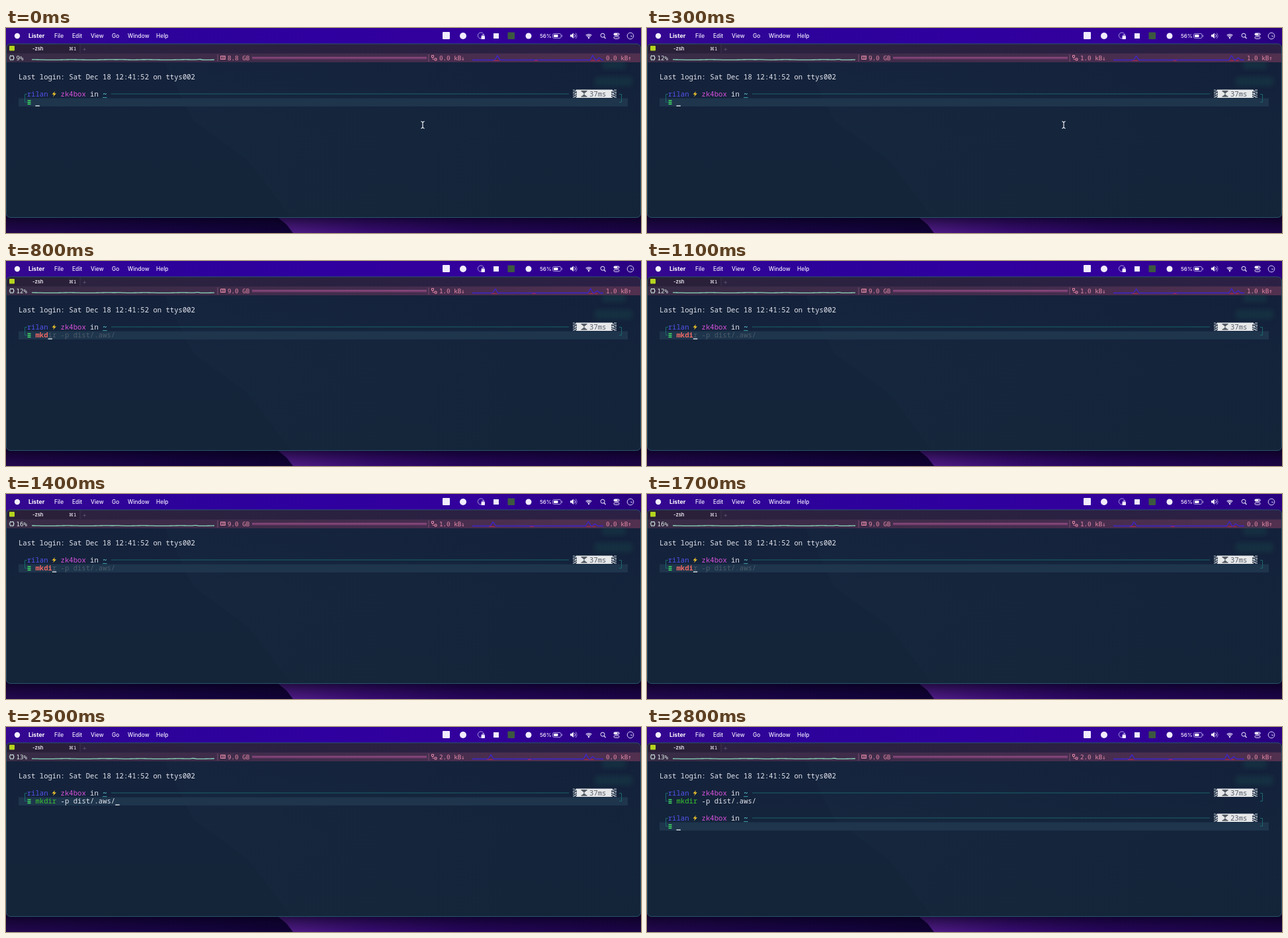
Recreate the animation shown at these times as an HTML page with a canvas. Size 960 by 311 pixels, loop 2.9 s.

```html
<!DOCTYPE html>
<html lang="en">
<head>
<meta charset="utf-8">
<title>Terminal autosuggestion</title>
<style>
  html, body { margin: 0; width: 100%; height: 100%; overflow: hidden; background: #150342; }
  canvas { display: block; }
</style>
</head>
<body>
<canvas id="stage" width="960" height="311"></canvas>
<script>
const ctx = document.getElementById('stage').getContext('2d');
const LOOP = 2900;
const CELL = 6.36, LEFT = 19;
const MONO = '10.6px "Noto Sans Mono", monospace';
const MONO_BOLD = 'bold ' + MONO;
const SMALL = '9.2px "DejaVu Sans Mono", monospace';
const UI = 'Inter, sans-serif';
const TEAL = '#19686c', WHITE = '#e4e6ee', PINK = '#e38aa6', ICON = '#f1ecff';
const COMMAND = 'mkdir -p dist/.aws/';

// Each entry holds from its time until the next one.
const typing = [
  { at: 0, typed: '', hint: '' },
  { at: 500, typed: 'm', hint: 'an cp' },
  { at: 700, typed: 'mk', hint: COMMAND.slice(2) },
  { at: 800, typed: 'mkd', hint: COMMAND.slice(3) },
  { at: 1000, typed: 'mkdi', hint: COMMAND.slice(4) },
  { at: 1900, typed: COMMAND, hint: '' },
  { at: 2700, typed: '', hint: '', done: true }
];
const stats = [
  { at: 0, cpu: 9, ram: '8.8', down: '0.0', up: '0.0' },
  { at: 300, cpu: 12, ram: '9.0', down: '1.0', up: '1.0' },
  { at: 1300, cpu: 16, ram: '9.0', down: '1.0', up: '0.0' },
  { at: 2300, cpu: 13, ram: '9.0', down: '2.0', up: '0.0' }
];
const indexAt = (list, t) => list.findLastIndex(item => item.at <= t);
const col = n => LEFT + n * CELL;

function rect(x, y, w, h, color, r = 0) {
  ctx.fillStyle = color;
  ctx.beginPath();
  ctx.roundRect(x, y, w, h, r);
  ctx.fill();
}
function outline(x, y, w, h, color, r = 0) {
  ctx.strokeStyle = color;
  ctx.lineWidth = 1;
  ctx.beginPath();
  ctx.roundRect(x, y, w, h, r);
  ctx.stroke();
}
function text(str, x, y, color, font = MONO) {
  ctx.font = font;
  ctx.fillStyle = color;
  ctx.fillText(str, x, y);
}
function line(points, color, width = 1) {
  ctx.strokeStyle = color;
  ctx.lineWidth = width;
  ctx.beginPath();
  points.forEach(([x, y]) => ctx.lineTo(x, y));
  ctx.stroke();
}
function shape(points, color) {
  ctx.fillStyle = color;
  ctx.beginPath();
  points.forEach(([x, y]) => ctx.lineTo(x, y));
  ctx.fill();
}
function arc(x, y, r, color, from = 0, to = Math.PI * 2, width = 1) {
  ctx.strokeStyle = color;
  ctx.lineWidth = width;
  ctx.beginPath();
  ctx.arc(x, y, r, from, to);
  ctx.stroke();
}
const dot = (x, y, r, color) => rect(x - r, y - r, 2 * r, 2 * r, color, r);
function gradient(x0, y0, x1, y1, ...colors) {
  const g = ctx.createLinearGradient(x0, y0, x1, y1);
  colors.forEach((c, i) => g.addColorStop(i / (colors.length - 1), c));
  return g;
}

function wallpaper() {
  rect(0, 0, 960, 26, gradient(0, 0, 960, 0, '#35088f', '#2d029b', '#2f009f', '#33009b', '#290080'));
  rect(0, 26, 960, 285, gradient(0, 0, 430, 0, '#2a0a5c', '#1c0550', '#12033c'));
  shape([[408, 285], [960, 285], [960, 311], [434, 311], [424, 298]],
    gradient(410, 0, 960, 0, '#6224a2', '#430f86', '#2e076c', '#26065e', '#200550'));
  // Window shadow
  rect(0, 285, 960, 26, gradient(0, 287, 0, 311, 'rgba(5,0,20,.68)', 'rgba(5,0,20,.4)', 'rgba(5,0,20,.18)'));
}

function menuBar() {
  dot(17, 12, 4.2, '#f4f0ff');
  text('Lister', 34, 15, '#fff', 'bold 8.8px ' + UI);
  [['File', 73], ['Edit', 100], ['View', 128], ['Go', 160], ['Window', 184], ['Help', 227]]
    .forEach(([label, x]) => text(label, x, 15, ICON, '500 8.4px ' + UI));

  rect(660, 6, 11, 11, ICON, 1);
  dot(691, 12, 5, ICON);
  arc(718, 11.5, 4.6, '#a99be0');
  rect(718.5, 12, 5.5, 5, ICON, 1);
  arc(721.2, 12, 1.6, ICON, Math.PI, 0);
  rect(737, 8, 8, 8, ICON);
  rect(758.5, 6.5, 10.5, 10.5, '#3c5940', 1);
  dot(790, 12, 4.5, ICON);
  text('56%', 807, 15, ICON, '500 8px ' + UI);

  outline(826.5, 8.5, 12.5, 7, '#a99be0', 2);
  rect(828, 10, 6.5, 4, '#fff', 1);
  rect(840, 10.5, 1, 3, '#a99be0');

  shape([[853, 10], [855, 10], [858, 7.5], [858, 16], [855, 13.5], [853, 13.5]], ICON);
  arc(857, 11.8, 3.6, ICON, -0.8, 0.8);
  arc(857, 11.8, 6, '#9f90dc', -0.8, 0.8);
  [2, 4.2, 6.4].forEach(r => arc(881, 16, r, ICON, -2.3, -0.84, 1.3));
  dot(881, 15.2, 1, ICON);
  arc(902, 11.2, 3, ICON);
  line([[904, 13.4], [906.5, 16]], ICON, 1.2);
  rect(918.5, 7.5, 9, 4, ICON, 2);
  dot(925.3, 9.5, 1.1, '#2d0090');
  outline(919, 13, 8, 3.2, ICON, 1.6);
  arc(944, 12, 4.8, '#d9d0fa');
  line([[944, 12], [947, 12.6]], '#d9d0fa');
}

function terminalWindow() {
  ctx.save();
  ctx.beginPath();
  ctx.roundRect(0.5, 24, 959, 263.5, 6);
  ctx.clip();
  rect(0, 24, 960, 264, gradient(0, 40, 0, 287, '#14213b', '#14253b', '#142539'));
  shape([[240, 52], [960, 52], [960, 288], [432, 288], [365, 200], [283, 140]],
    gradient(250, 0, 960, 0, 'rgba(30,50,75,.16)', 'rgba(24,44,66,.14)', 'rgba(15,30,55,.1)'));
  rect(0, 24, 960, 14.5, gradient(0, 0, 960, 0, '#2d2340', '#2a2140', '#2c2145'));
  rect(0, 24, 112, 14.5, '#2a2039');
  rect(0, 38.5, 960, 13.5, gradient(0, 0, 960, 0, '#382c46', '#3f2c4a', '#462d4f', '#52304f'));
  ctx.filter = 'blur(3px)';
  rect(901, 50, 36, 12, 'rgba(24,72,76,.38)', 4);
  rect(890, 74, 57, 14, 'rgba(24,72,76,.38)', 4);
  ctx.filter = 'none';
  ctx.restore();
  outline(0.5, 24, 959, 263.5, '#28556b', 6);

  rect(5, 27, 8, 7.5, '#b5d51e', 1);
  text('-zsh', 40, 34, '#f0edf4', '600 7.5px ' + UI);
  text('⌘1', 95, 34, '#f0edf4', '7px "DejaVu Sans", sans-serif');
  rect(111.5, 25, 1, 13, '#40354f');
  text('+', 115.5, 34.5, '#5f546d', '10px ' + UI);
}

function statusBar(stage) {
  const s = stats[stage], shift = stage * 3.3;
  outline(6, 42.5, 5.5, 5.5, '#d5e7e1');
  for (const p of [7.2, 10.2]) {
    line([[p, 41], [p, 42.3]], '#a9c5c0');
    line([[p, 48], [p, 49.6]], '#a9c5c0');
  }
  line([[4.5, 45.2], [6, 45.2]], '#a9c5c0');
  line([[11.5, 45.2], [13, 45.2]], '#a9c5c0');
  text(s.cpu + '%', 15.5, 48.7, '#dbe9e4', SMALL);

  const cpu = [];
  for (let x = 39; x <= 316; x += 3) {
    const u = x + shift;
    const bump = Math.exp(-(((u - 293) / 3) ** 2)) + 0.4 * Math.exp(-(((u - 178) / 9) ** 2));
    cpu.push([x, 48.2 - bump + 0.25 * Math.sin(u * 0.11)]);
  }
  line(cpu, '#88d9bd', 1.3);
  rect(319.5, 40, 1, 11, '#78506f');
  rect(638.5, 40, 1, 11, '#78506f');

  outline(324.5, 42.5, 7, 5, PINK);
  line([[327, 42], [327, 48]], PINK);
  line([[329.5, 42], [329.5, 48]], PINK);
  text(s.ram + ' GB', 335, 48.7, PINK, SMALL);
  line([[372, 44.5], [636, 44.5]], '#b5599b');
  line([[372, 46.5], [636, 46.5]], '#9a4b86');

  outline(643.5, 41.5, 3, 3, PINK);
  outline(648, 46, 3, 3, PINK);
  line([[645, 45], [645, 47.5], [648, 47.5]], '#b46a8d');
  text(s.down + ' kB↓', 655, 48.7, PINK, SMALL);
  text(s.up + ' kB↑', 907, 48.7, PINK, SMALL);

  const net = [];
  for (let x = 705; x <= 903; x++) {
    const u = x + shift;
    const peak = (at, height, half) => Math.max(0, height * (1 - Math.abs(u - at) / half));
    net.push([x, 48.5 - peak(743, 6.5, 4) - peak(887, 7, 4) - peak(897, 3.5, 4)]);
  }
  line(net, '#3c24d2', 1.3);
  [[737, 9], [799, 5], [884, 7], [893, 5]].forEach(([x, w]) => rect(x - shift, 48.8, w, 1.1, '#b02850'));
}

function timingPill(y, label) {
  const top = y - 6.5;
  // Dithered ends, denser towards the pill.
  for (let i = 0; i < 4; i++) {
    for (let j = 0; j < 8; j++) {
      if ((i * 5 + j * 3) % 7 >= 4) continue;
      const shade = i < 2 ? '#dfe3e7' : '#96a2ad';
      rect(861.5 - i * 1.5, top + j * 1.55, 1.5, 1.5, shade);
      rect(915 + i * 2, top + j * 1.55, 2, 1.5, shade);
    }
  }
  rect(863, top, 52, 12.5, '#e6e8ea');
  shape([[870, y - 4], [878, y - 4], [870, y + 4], [878, y + 4]], '#565d65');
  rect(869.5, y - 5, 9, 1.5, '#565d65');
  rect(869.5, y + 3.2, 9, 1.5, '#565d65');
  text(label, 882, y + 3.5, '#575e66');
}

function prompt(y, label, active) {
  if (active) rect(LEFT, y + 6.5, 921, 12.5, '#1e354c');
  line([[32, y + 0.5], [28.5, y + 0.5], [28.5, y + 12.5], [31.5, y + 12.5]], TEAL);
  line([[927, y + 0.5], [930.5, y + 0.5], [930.5, y + 12.5], [927, y + 12.5]], TEAL);
  line([[159, y], [851, y]], '#1a626b');
  text('rilan', col(2), y + 3.5, '#5354ed');
  shape([[74, y - 4], [69.5, y + 0.7], [72.5, y + 0.7], [71, y + 4.5], [76, y - 0.8], [73, y - 0.8]], '#f1c62d');
  text('zk4box', col(10), y + 3.5, '#d652dd');
  text('in', col(17), y + 3.5, WHITE);
  text('~', col(20), y + 3.5, '#65d4de', MONO_BOLD);
  rect(col(20), y + 5, CELL, 1, '#3b9eab');
  timingPill(y, label);
  for (const dy of [9.5, 12.1, 14.7]) rect(32.5, y + dy, 5, 1.5, '#42df66');
}

function commandLine(y, typed, hint) {
  const base = y + 16.2;
  if (typed === COMMAND) {
    text('mkdir', col(4), base, '#39c62f');
    text(COMMAND.slice(5), col(9), base, WHITE);
  } else {
    text(typed, col(4), base, '#ed6864', MONO_BOLD);
    text(hint, col(4 + typed.length), base, '#4c5c6b');
  }
}

function mousePointer(x, y) {
  line([[x, y - 4.5], [x, y + 4.5]], '#eceef2', 1.2);
  for (const s of [-1, 1]) {
    line([[x - 2.5, y + 5.5 * s], [x, y + 4 * s], [x + 2.5, y + 5.5 * s]], '#eceef2', 1.2);
  }
}

function draw(now) {
  const t = now % LOOP;
  const { typed, hint, done } = typing[indexAt(typing, t)];
  wallpaper();
  menuBar();
  terminalWindow();
  statusBar(indexAt(stats, t));
  text('Last login: Sat Dec 18 12:41:52 on ttys002', LEFT, 77.8, WHITE);
  prompt(100, '37ms', !done);
  commandLine(100, done ? COMMAND : typed, hint);
  if (done) prompt(138, '23ms', true);
  rect(col(4 + typed.length), done ? 155.5 : 117.5, CELL, 1.3, '#f0f2f5');
  if (t < typing[1].at) mousePointer(630, 147);
  requestAnimationFrame(draw);
}
requestAnimationFrame(draw);
</script>
</body>
</html>
```
